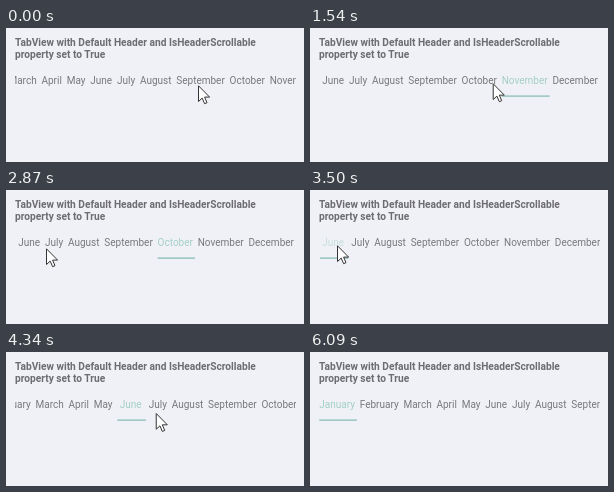
Animation, 298 px wide and 134 px high, one loop 7000 ms. Source, as an HTML page:

```html
<!DOCTYPE html>
<html lang="en">
<head>
<meta charset="utf-8">
<style>
html, body { margin: 0; width: 100%; height: 100%; overflow: hidden; background: #f0f1f6; }
svg { display: block; width: 298px; height: 134px; }
text { font: 10px Roboto, sans-serif; fill: #77787c; }
.title { font-weight: 700; font-size: 10.18px; fill: #6c6c71; }
#tabs .on { fill: #a3cfc7; }
#tabs .fresh { opacity: .55; }
</style>
</head>
<body>
<svg viewBox="0 0 298 134">
  <clipPath id="view"><rect x="9" y="40" width="281" height="40"/></clipPath>
  <text class="title" x="9" y="17.6">TabView with Default Header and IsHeaderScrollable</text>
  <text class="title" x="9" y="29.6">property set to True</text>
  <g id="tabs" clip-path="url(#view)">
    <rect id="line" y="67.3" height="1.7" fill="#a2c9c5"/>
  </g>
  <path id="cursor" d="M.5 .8V16.5L4.2 13.1 6.6 18.7 9 17.7 6.6 12.1H11.6Z" fill="#fff" stroke="#333" stroke-linejoin="round"/>
</svg>
<script>
const $ = id => document.getElementById(id);
const STEP = 70, LOOP = 7000, EXIT = 6090;
const LEFT = 9.3, GAP = 4.8, MIN_TAB = 26.6;
const MAX_SCROLL = 163, DRAG_RATIO = .93;
const months = ['January', 'February', 'March', 'April', 'May', 'June', 'July',
  'August', 'September', 'October', 'November', 'December'];

const move = (start, x, y, time = 350) => ({ start, x, y, time });
const drag = (...args) => ({ ...move(...args), drag: true });
const moves = [
  drag(140, 109, 56, 490),
  move(770, 209, 55, 280),
  move(1260, 163, 55, 490),
  move(1890, 99, 50),
  move(2520, 40, 58),
  move(2940, 27, 55),
  drag(3710, 177, 62, 770),
  drag(4480, 201, 60, 210),
  move(4760, 28, 57),
  move(5880, 66, 65, 140)
];
const taps = [
  { time: 1330, month: 'November' },
  { time: 1960, month: 'October' },
  { time: 3500, month: 'June' },
  { time: 5600, month: 'January' }
];

const clamp = (v, max) => Math.min(max, Math.max(0, v));

// Pointer place and header scroll after all moves up to time t
function pose(t) {
  let x = 192, y = 57, scroll = 91;
  for (const m of moves) {
    const f = clamp((t - m.start) / m.time, 1);
    const dx = (m.x - x) * f;
    if (m.drag) scroll = clamp(scroll - dx * DRAG_RATIO, MAX_SCROLL);
    x += dx;
    y += (m.y - y) * f;
    if (f < 1) break;
  }
  return { x, y, scroll };
}

function set(el, attrs) {
  for (const name in attrs) el.setAttribute(name, attrs[name]);
}

let nextX = LEFT;
const tabs = months.map(name => {
  const el = document.createElementNS('http://www.w3.org/2000/svg', 'text');
  el.textContent = name;
  el.setAttribute('y', 56);
  $('tabs').append(el);
  const tab = { el, x: nextX, w: el.getComputedTextLength() };
  nextX += tab.w + GAP;
  return tab;
});

function draw(t) {
  const { x, y } = pose(t);
  let { scroll } = pose(t - STEP);
  const tap = taps.findLast(p => p.time <= t);
  const sel = tap ? months.indexOf(tap.month) : -1;
  let pad = 0;
  if (tap) {
    // A narrow selected tab pushes its neighbours apart
    pad = Math.max(0, (MIN_TAB - tabs[sel].w) / 2);
    scroll = Math.min(scroll, tabs[sel].x - LEFT);
    set($('line'), { x: tabs[sel].x - scroll - pad, width: tabs[sel].w + 2 * pad + 2 });
  }
  tabs.forEach((tab, i) => {
    set(tab.el, { x: tab.x - scroll + pad * Math.sign(i - sel) });
    tab.el.classList.toggle('on', i === sel);
    tab.el.classList.toggle('fresh', i === sel && t < tap.time + 2 * STEP);
  });
  set($('line'), { visibility: tap ? 'visible' : 'hidden' });
  set($('cursor'), {
    transform: `translate(${x} ${y})`,
    visibility: t < EXIT ? 'visible' : 'hidden'
  });
}

function tick() {
  draw(Math.floor(performance.now() % LOOP / STEP) * STEP);
  requestAnimationFrame(tick);
}
tick();
</script>
</body>
</html>
```
